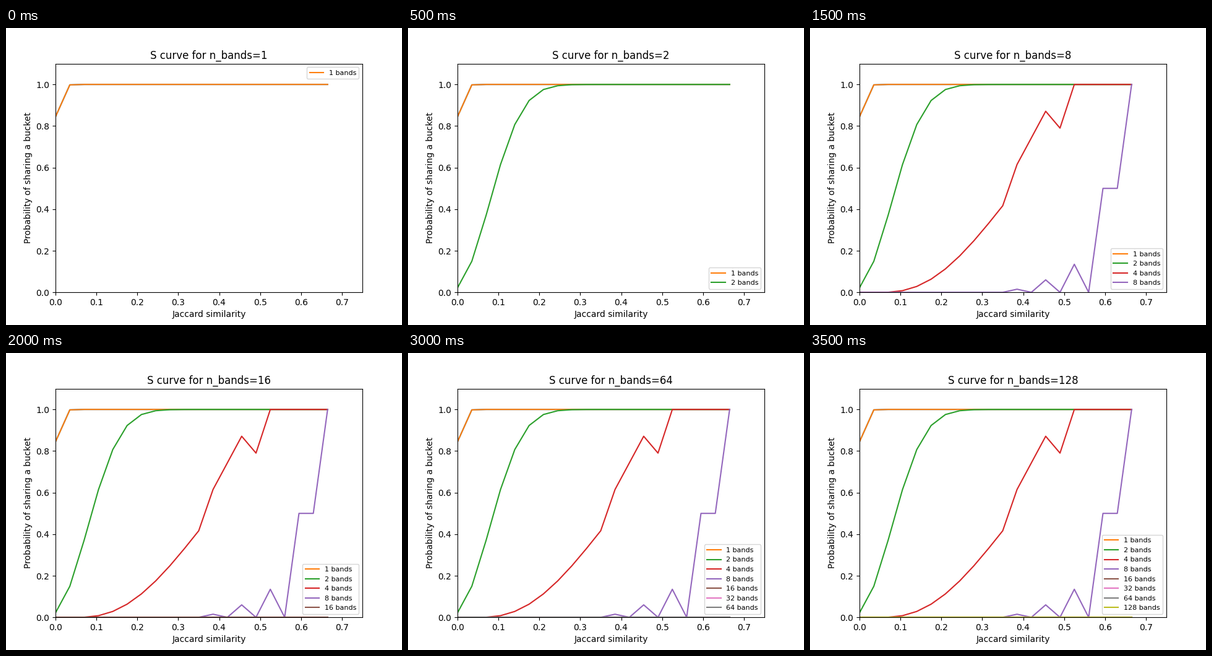
Write a matplotlib script that moves like this. It is 640x480 px and loops after 4 s.

```python
import numpy as np
import matplotlib.pyplot as plt
from matplotlib.animation import FuncAnimation

BANDS = [2 ** i for i in range(8)]
k = np.arange(20)
similarity = 0.035 * k


def s_curve(offset, slope):
    """Weibull-shaped rise from 0 to 1."""
    t = np.maximum(0, offset + slope * k)
    return 1 - np.exp(-t ** 2.3)


def four_bands():
    """Smooth rise that turns ragged before it saturates."""
    ragged = np.interp(k, [11, 13, 14, 15], [0.615, 0.871, 0.79, 1])
    return np.where(k < 11, s_curve(-0.153, 0.0917), ragged)


def eight_bands():
    """Growing spikes at every second point, then two steps of a half."""
    spikes = 0.015 * ((k - 9) / 2) ** 2 * (k % 2) * (k > 9)
    steps = 0.5 * (k >= 17) + 0.5 * (k >= 19)
    return np.where(k < 17, spikes, steps)


curves = {
    1: s_curve(1.31, 0.9),
    2: s_curve(0.19, 0.263),
    4: four_bands(),
    8: eight_bands(),
}

fig, ax = plt.subplots(figsize=(6.4, 4.8), dpi=100)
ax.set_xlim(0, 0.75)
ax.set_ylim(0, 1.1)
ax.set_xlabel("Jaccard similarity")
ax.set_ylabel("Probability of sharing a bucket")

# The first curve sits on an unlabelled copy in the first cycle colour.
ax.plot(similarity, curves[1], color="C0")
lines = [
    ax.plot(similarity, curves.get(n, 0 * similarity),
            color=f"C{i + 1}", label=f"{n} bands")[0]
    for i, n in enumerate(BANDS)
]


def update(step):
    for i, line in enumerate(lines):
        line.set_visible(i <= step)
    ax.set_title(f"S curve for n_bands={BANDS[step]}")
    ax.legend(handles=lines[:step + 1], fontsize=8,
              loc="lower right" if step else "upper right")
    return lines


anim = FuncAnimation(fig, update, frames=len(BANDS), interval=500,
                     repeat=True, repeat_delay=0, blit=False)
plt.show()
```
